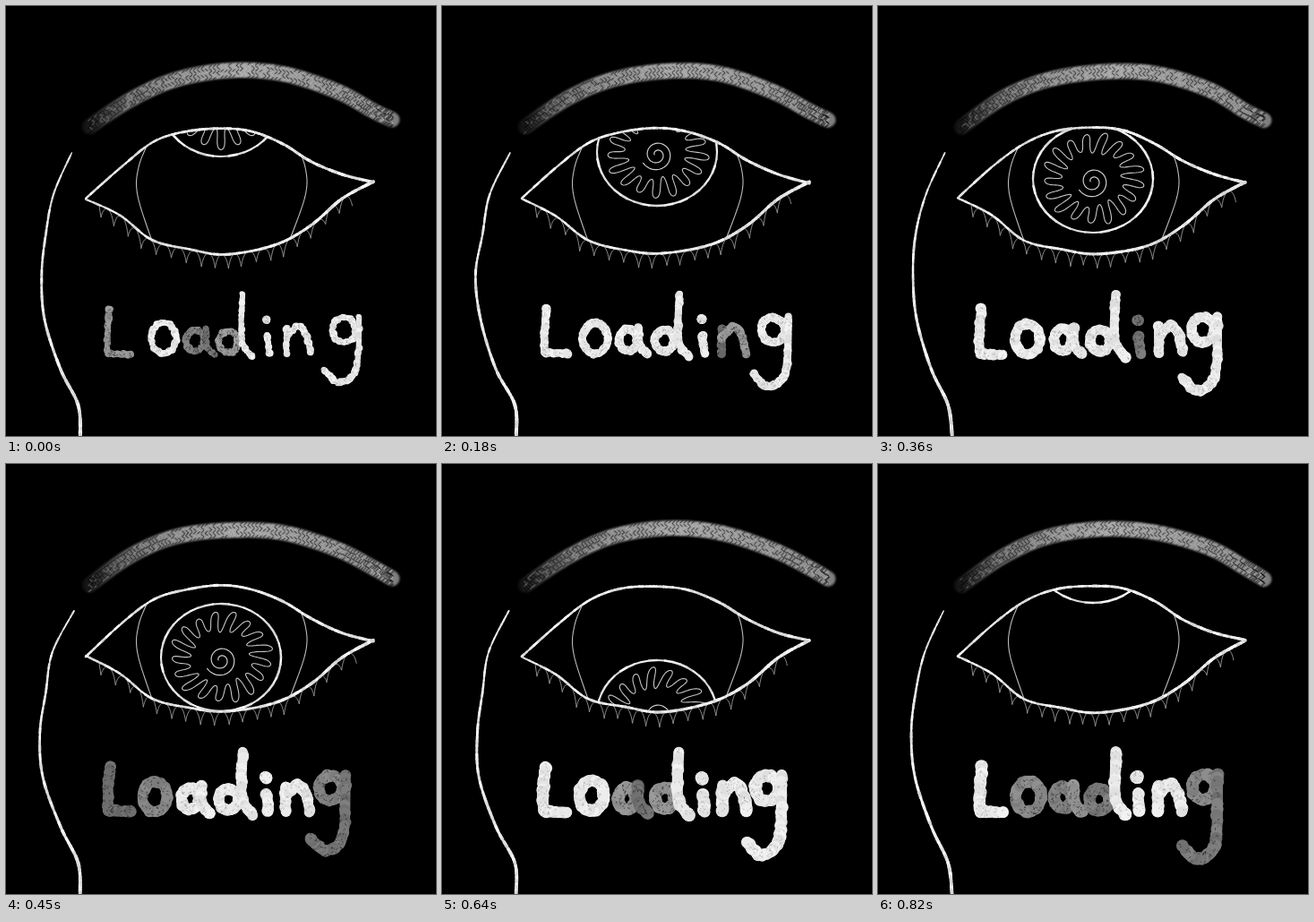
These frames come from a looping animation (480 px wide and 480 px high, 0.91 s). An HTML page with a canvas:

```html
<!DOCTYPE html>
<html lang="en">
<head>
<meta charset="utf-8">
<title>Loading eye</title>
<style>
html, body { margin: 0; width: 100%; height: 100%; overflow: hidden; background: #000; }
canvas { display: block; }
</style>
</head>
<body>
<canvas id="stage" width="480" height="480"></canvas>
<script>
const ctx = document.getElementById('stage').getContext('2d');
const LOOP = 910;
const HOLD = 90;
const LONG_STEP = 5; // this drawing stays 10 ms longer

// Per drawing: height of the rolling iris, letters with little paint.
const irisY = [108, 135, 163, 178, 193, 216, 243, 279, 312, 95];
const faded = ['Lad', 'La', 'n', 'n', 'i', 'Log', 'n', 'ad', 'oa', 'oadg'];

// Key points of the face, redrawn by hand each step.
const upperLid = [[89, 215], [130, 178], [165, 152], [200, 140], [240, 136], [275, 140], [310, 154], [340, 173], [375, 188], [410, 197]];
const lowerLid = [[410, 197], [375, 216], [340, 246], [300, 267], [245, 277], [205, 272], [163, 262], [127, 234], [89, 215]];
const browLine = [[93, 136], [140, 103], [190, 82], [250, 73], [310, 76], [370, 95], [410, 117], [431, 128]];
const cheekLine = [[74, 164], [53, 210], [44, 255], [39, 300], [43, 350], [61, 405], [80, 445], [81, 480]];

let seed;
const random = () => (seed = (seed * 16807) % 2147483647) / 2147483647;
const around = (v, spread) => v + spread * (random() * 2 - 1);
const grey = v => `rgb(${v},${v},${v})`;
const redraw = (pts, spread) => pts.map(([x, y]) => [x, around(y, spread)]);

// Catmull-Rom samples through the points.
function smooth(pts, steps = 10) {
  const out = [], last = pts.length - 1;
  for (let i = 0; i < last; i++) {
    const a = pts[Math.max(i - 1, 0)], b = pts[i], c = pts[i + 1], d = pts[Math.min(i + 2, last)];
    for (let s = 0; s < steps; s++) {
      const t = s / steps;
      out.push([0, 1].map(k => b[k] + .5 * t * (c[k] - a[k] +
        t * (2 * a[k] - 5 * b[k] + 4 * c[k] - d[k] + t * (3 * (b[k] - c[k]) + d[k] - a[k])))));
    }
  }
  return [...out, pts[last]];
}

function polar(cx, cy, count, point) {
  return Array.from({ length: count + 1 }, (_, i) => {
    const [a, rx, ry = rx] = point(i / count);
    return [cx + rx * Math.cos(a), cy + ry * Math.sin(a)];
  });
}
const ring = (cx, cy, rx, ry) => polar(cx, cy, 48, t => [t * 2 * Math.PI, rx, ry]);

function trace(pts) {
  ctx.beginPath();
  pts.forEach(([x, y]) => ctx.lineTo(x, y));
}

function line(pts, width, color) {
  trace(pts);
  ctx.lineWidth = width;
  ctx.strokeStyle = color;
  ctx.stroke();
}

// Slightly uneven line whose width runs from w0 to w1.
function chalk(pts, w0, w1) {
  for (let i = 1; i < pts.length; i++) {
    const w = w0 + (w1 - w0) * i / pts.length;
    line([pts[i - 1], pts[i]], around(w, .4), grey(around(232, 22)));
  }
}

function drawBrow() {
  const pts = smooth(redraw(browLine, 1.5), 14);
  const shade = ctx.createLinearGradient(82, 0, 440, 0);
  [[0, 8], [.07, 50], [.15, 105], [.3, 140], [.5, 165], [.8, 145], [1, 125]]
    .forEach(([at, v]) => shade.addColorStop(at, grey(v)));
  ctx.filter = 'blur(1.2px)';
  line(pts, 17, shade);
  ctx.filter = 'none';
  for (let row = -2; row <= 2; row++) {
    const slant = row % 2 ? 1.2 : -1.2;
    pts.forEach(([x, y]) => {
      const v = random() < .7 ? 0 : 230;
      const cy = around(y + row * 3.5, .6);
      line([[x - 1.3, cy - slant], [x + 1.3, cy + slant]], 1.1, `rgba(${v},${v},${v},${v ? .25 : .5})`);
    });
  }
}

// Arches hanging from the lid that meet in thin points.
function drawLashes(lid) {
  const lidY = x => lid.reduce((a, b) => Math.abs(b[0] - x) < Math.abs(a[0] - x) ? b : a)[1];
  const tip = x => [x, lidY(x) + around(15, 2)];
  let [x, y] = tip(106);
  ctx.beginPath();
  ctx.moveTo(x - 2, lidY(x));
  ctx.lineTo(x, y);
  while (x < 385) {
    const [nextX, nextY] = tip(x + around(15.5, 1.5));
    const top = lidY((x + nextX) / 2) - 5;
    ctx.bezierCurveTo(x + 3, top, nextX - 3, top, nextX, nextY);
    [x, y] = [nextX, nextY];
  }
  ctx.lineWidth = .9;
  ctx.strokeStyle = '#999';
  ctx.stroke();
}

function drawIris(cx, cy, lean) {
  const rx = 67, ry = 60, petals = 17;
  chalk(ring(cx, cy, rx, ry), 2.4, 2.4);
  if (cy < 100) return;
  const flower = polar(cx, cy, 500, t => {
    const u = t * petals * 2 * Math.PI;
    const r = .67 + .17 * Math.sin(u) * (1 + .2 * Math.sin(5 * t * 2 * Math.PI + lean * 9));
    return [(u - .35 * Math.sin(2 * u)) / petals + lean * (r - .6), rx * r, ry * r];
  });
  line(flower, 1.1, '#c4c4c4');
  line(polar(cx, cy + 3, 70, t => [2.6 - 12 * (1 - t), 3 + 15 * t]), 1.2, '#ccc');
}

function drawEye(step) {
  const upper = smooth(redraw(upperLid, 1)), lower = smooth(redraw(lowerLid, 1));
  ctx.save();
  trace([...upper, ...lower]);
  ctx.clip();
  line(smooth([[160, 150], [148, 180], [147, 212], [165, 268]]), 1.1, '#bbb');
  line(smooth([[322, 150], [334, 180], [334, 212], [314, 268]]), 1.1, '#bbb');
  drawIris(240, irisY[step], step * .06);
  ctx.restore();
  drawLashes(lower);
  chalk(upper, 2.4, 3.2);
  chalk(lower, 3.6, 2.2);
}

// Rough dabs along a path, scratched more where paint is thin.
function brush(pts, width, thin) {
  const tone = thin ? around(130, 25) : 232;
  line(pts, width - 2, grey(tone));
  for (const [x, y] of pts) {
    ctx.fillStyle = grey(around(tone, 12));
    ctx.beginPath();
    ctx.arc(around(x, 1), around(y, 1), around(width / 2 - .7, .9), 0, 7);
    ctx.fill();
  }
  for (const [x, y] of pts) {
    const px = around(x, width / 2), py = around(y, width / 2);
    line([[px, py], [around(px, 2), around(py, 2)]], 1, `rgba(0,0,0,${thin ? .45 : .18})`);
  }
}

function drawWord(step) {
  const w = Math.min(14, 8 + step), drift = Math.min(step, 4) / 4;
  const gEnd = 420 + 2.3 * step;
  const paint = (letter, pts) => brush(pts, w, faded[step].includes(letter));
  const letter = (name, x, y, ...strokes) => {
    const ox = around(x, 1), oy = around(y, 1);
    strokes.forEach(s => paint(name, s.map(([u, v]) => [ox + u, oy + v])));
  };
  const curve = (...pts) => smooth(pts, 12);

  letter('L', 116, 338, curve([0, 0], [-2, 24], [-2, 47], [4, 50], [24, 51]));
  letter('o', 176 - 9 * drift, 371, ring(0, 0, 14, 17));
  letter('a', 211 - 5 * drift, 373, ring(0, 0, 10, 12), curve([12, -14], [13, 6], [22, 16]));
  letter('d', 248, 374, ring(0, 0, 11, 12));
  letter(' ', 265, 322, curve([0, 0], [-1, 50], [11, 70]));
  letter('i', 290, 350, curve([0, 0], [.5, .5]), curve([1, 18], [3, 38]));
  letter('n', 313, 359, curve([0, 0], [0, 28]), curve([0, 11], [13, -2], [22, 8], [27, 28]));
  letter('g', 378 - 15 * drift, 361, ring(0, 0, 13, 14));
  const gx = 378 - 15 * drift;
  paint('g', curve([gx + 16, 347], [gx + 15, gEnd - 28], [gx + 8, gEnd - 7], [gx - 8, gEnd], [gx - 23, gEnd - 14]));
}

function draw(step) {
  seed = 4241 * (step + 1);
  ctx.fillStyle = '#000';
  ctx.fillRect(0, 0, 480, 480);
  ctx.lineCap = ctx.lineJoin = 'round';
  drawBrow();
  chalk(smooth(cheekLine.map(([x, y]) => [around(x, 2), y])), 1.8, 4);
  drawEye(step);
  drawWord(step);
}

function stepAt(time) {
  const longEnd = (LONG_STEP + 1) * HOLD + 10;
  if (time >= longEnd) return LONG_STEP + 1 + Math.floor((time - longEnd) / HOLD);
  return Math.min(LONG_STEP, Math.floor(time / HOLD));
}

let shown = -1;
function tick() {
  const step = stepAt(performance.now() % LOOP);
  if (step !== shown) draw(shown = step);
  requestAnimationFrame(tick);
}
tick();
</script>
</body>
</html>
```
